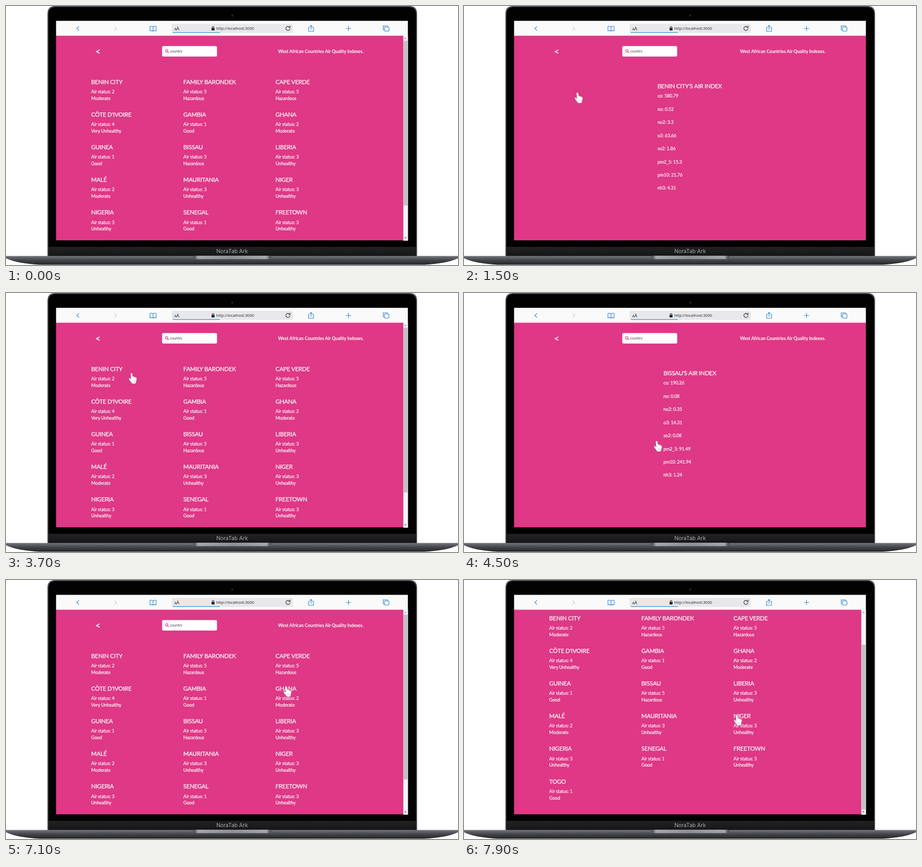
Write an HTML page that moves like this. It is 873 px wide and 501 px high and loops after 8 s.

```html
<!DOCTYPE html>
<html lang="en">
<head>
<meta charset="utf-8">
<title>Air quality indexes</title>
<style>
  html, body { margin: 0; width: 100%; height: 100%; overflow: hidden; background: #fff; }
  svg { display: block; width: 873px; height: 501px; }
  text { white-space: pre; }
  .page { font-family: Lato, sans-serif; font-size: 8.8px; fill: #fff; }
  .page text { letter-spacing: -.09px; stroke: #fff; stroke-width: .2px; }
  .page .h { font-size: 11.4px; letter-spacing: -.18px; stroke-width: .25px; }
  .page .brand { font-size: 8.6px; font-weight: 700; letter-spacing: 0; stroke: none; }
  .page .hint { font-size: 7.1px; fill: #444; letter-spacing: 0; stroke: none; }
  .blue { fill: none; stroke: #3488d3; stroke-width: 1.1; }
  .list, .benin, .bissau, .cursor, .scroll, .thumb { animation: 8s linear infinite; }

  /* Pages switch hard */
  .list { animation-name: list; animation-timing-function: step-end; }
  .benin { animation-name: benin; animation-timing-function: step-end; }
  .bissau { animation-name: bissau; animation-timing-function: step-end; }
  @keyframes list {
    0%, 42.5%, 83.75%, 100% { visibility: visible; }
    18.75%, 56.25% { visibility: hidden; }
  }
  @keyframes benin {
    0%, 42.5%, 100% { visibility: hidden; }
    18.75% { visibility: visible; }
  }
  @keyframes bissau {
    0%, 83.75%, 100% { visibility: hidden; }
    56.25% { visibility: visible; }
  }

  .scroll { animation-name: scroll; }
  .thumb { animation-name: thumb; }
  @keyframes scroll {
    0%, 91.25% { transform: translateY(0); animation-timing-function: steps(5, start); }
    97.5%, 100% { transform: translateY(-73px); }
  }
  @keyframes thumb {
    0%, 91.25% { transform: translateY(0); animation-timing-function: steps(5, start); }
    97.5%, 100% { transform: translateY(58px); }
  }

  /* The pointer advances in ticks of 100 ms */
  .cursor { animation-name: move, show; }
  @keyframes show {
    0% { opacity: 0; animation-timing-function: step-end; }
    5%, 100% { opacity: 1; }
  }
  @keyframes move {
    0%, 7.5% { transform: translate(300px, 245px); animation-timing-function: steps(2, start); }
    10%, 12.5% { transform: translate(232px, 182px); animation-timing-function: steps(2, start); }
    15%, 21.25% { transform: translate(219px, 167.2px); animation-timing-function: steps(11, start); }
    35% { transform: translate(179px, 95px); animation-timing-function: steps(2, start); }
    37.5%, 46.25% { transform: translate(177.5px, 89px); animation-timing-function: steps(3, start); }
    50%, 61.25% { transform: translate(372px, 286px); animation-timing-function: steps(4, start); }
    66.25%, 67.5% { transform: translate(335px, 195px); animation-timing-function: steps(4, start); }
    72.5%, 75% { transform: translate(235px, 118px); animation-timing-function: steps(3, start); }
    78.75%, 87.5% { transform: translate(176.5px, 87px); animation-timing-function: steps(2, start); }
    90%, 91.25% { transform: translate(541px, 205.2px); animation-timing-function: steps(5, start); }
    97.5% { transform: translate(528px, 257px); animation-timing-function: step-end; }
    98.75%, 100% { transform: translate(526.5px, 260.5px); }
  }
</style>
</head>
<body>
<svg viewBox="0 0 873 501">
  <defs>
    <clipPath id="view"><rect x="96.7" y="57.5" width="679.5" height="395.7"/></clipPath>
    <linearGradient id="chin" x2="0" y2="1">
      <stop offset="0" stop-color="#222224"/><stop offset="1" stop-color="#161617"/>
    </linearGradient>
    <linearGradient id="deck" x2="0" y2="1">
      <stop offset="0" stop-color="#77787c"/><stop offset=".25" stop-color="#5b5c61"/>
      <stop offset=".45" stop-color="#46474c"/><stop offset="1" stop-color="#232327"/>
    </linearGradient>
    <linearGradient id="notch">
      <stop offset="0" stop-color="#3c3d40"/><stop offset=".06" stop-color="#a6a7aa"/>
      <stop offset=".5" stop-color="#8f9093"/>
      <stop offset=".94" stop-color="#a6a7aa"/><stop offset="1" stop-color="#3c3d40"/>
    </linearGradient>
  </defs>

  <!-- Lid -->
  <path d="M80 484V15Q80 0 95 0H779Q794 0 794 15V484Z" fill="#505155"/>
  <path d="M82 484V16Q82 2 96 2H778Q792 2 792 16V484Z" fill="#020203"/>
  <rect x="82.5" y="466" width="709" height="17.5" fill="url(#chin)"/>
  <circle cx="437" cy="18.5" r="2.4" fill="#17181c"/>
  <circle cx="437" cy="18.5" r="1" fill="#29303c"/>
  <text x="436.7" y="478.3" text-anchor="middle" font-family="Inter, sans-serif" font-size="10.4px" fill="#aaaaac">NoraTab Ark</text>

  <!-- Base -->
  <path d="M0 483.6H873V488Q852 498 808 500.5H65Q21 498 0 488Z" fill="url(#deck)"/>
  <path d="M362 483H512V484Q512 489.5 505 489.5H369Q362 489.5 362 484Z" fill="url(#notch)"/>

  <!-- Browser bar -->
  <rect x="96.7" y="28.7" width="679.5" height="29.3" fill="#fafafa"/>
  <rect x="320" y="34.5" width="234" height="17.5" rx="3" fill="#e8e8ea"/>
  <path d="M322 51.4H413" stroke="#3b93d8" stroke-width="1.2"/>
  <g class="blue">
    <path d="M141 39.3L136.7 43.5L141 47.7"/>
    <path d="M209.5 39.3L213.8 43.5L209.5 47.7" stroke="#c9cbce"/>
    <path d="M284 40.3Q281 38.2 278 39.5V48Q281 47 284 48.5Q287 47 290 48V39.5Q287 38.2 284 40.3V48.5"/>
    <path d="M587 41.5H584.5V49H594V41.5H591.5M589.2 46V37.8M586.8 40L589.2 37.6L591.6 40"/>
    <path d="M656.5 43.5H666.5M661.5 38.5V48.5"/>
    <path d="M731 46H728.6V38.2H736.8V40.3"/>
    <rect x="731" y="40.5" width="8.6" height="8" rx="1"/>
    <path d="M547.6 40.8A4 4 0 1 0 548.5 43.8" stroke="#333"/>
    <path d="M548.8 38.3V41.7H545.4" stroke="#333"/>
    <path d="M398.3 43V41.3A1.6 1.6 0 0 1 401.5 41.3V43" stroke="#222"/>
  </g>
  <rect x="397" y="42.6" width="5.8" height="4.7" rx=".7" fill="#222"/>
  <g font-family="Open Sans, sans-serif" fill="#222">
    <text x="325" y="47" font-size="6.8px">A</text>
    <text x="329" y="47" font-size="8.8px">A</text>
    <text x="406" y="46.1" font-size="7.55px">http://localhost:3000</text>
  </g>

  <!-- Pages -->
  <g clip-path="url(#view)">
    <rect x="96" y="57" width="681" height="397" fill="#de3886"/>
    <g class="page list">
      <g class="scroll" id="countries"></g>
      <rect x="767.4" y="57" width="9" height="397" fill="#f4f4f4"/>
      <rect class="thumb" x="768" y="67" width="7.4" height="319" fill="#c1c1c1"/>
      <path d="M769.3 63.7L771.5 61L773.7 63.7Z" fill="#a3a3a3"/>
      <path d="M769.3 447.4L771.5 450.1L773.7 447.4Z" fill="#606060"/>
    </g>
    <g class="page benin" id="benin"></g>
    <g class="page bissau" id="bissau"></g>
  </g>

  <g class="cursor">
    <g transform="scale(1.05)">
      <path d="M-1.7 1.5Q-1.6 0 0 0Q1.5 0 1.7 1.5L2.3 6.3Q4.3 5.6 5 7.2Q6.7 6.5 7.4 8.1Q9.6 7.5 9.7 9.8Q9.8 13 8.6 15.8L8.3 19.3Q4 20.4 .4 19.5L-.3 17.3Q-2.6 15.2-4.6 11.7Q-5.5 9.7-4 9.3Q-2.6 9.1-1 11.4Z"
        fill="#fff" stroke="#6b2c4a" stroke-opacity=".6" stroke-width=".6"/>
      <path d="M2.4 6.5L2.7 9.5M5.1 7.3L5.3 9.8M7.5 8.2L7.6 10.3M2 13.5V17M4.2 13.5V17M6.3 13.3V16.8"
        fill="none" stroke="#a5a5a9" stroke-width=".5"/>
    </g>
  </g>
</svg>
<script>
  const $ = id => document.getElementById(id);
  const text = (x, y, s, cls = '') => `<text x="${x}" y="${y}" class="${cls}">${s}</text>`;

  function header(arrowX, boxX, titleX) {
    return `<path d="M${arrowX + 7} 84.9L${arrowX + .8} 88.2L${arrowX + 7} 91.5" fill="none" stroke="#fff" stroke-width="1.6"/>
      <rect x="${boxX}" y="77.5" width="106" height="20.2" rx="2.5"/>
      <circle cx="${boxX + 8.8}" cy="86.6" r="2.3" fill="none" stroke="#de3886" stroke-width="1.1"/>
      <path d="M${boxX + 10.5} 88.3l2.7 2.6" stroke="#de3886" stroke-width="1.3"/>`
      + text(boxX + 15.2, 89.8, 'country', 'hint')
      + text(titleX, 90.6, 'West African Countries Air Quality Indexes.', 'brand');
  }

  const levels = ['', 'Good', 'Moderate', 'Unhealthy', 'Very Unhealthy', 'Hazardous'];
  const countries = [
    ['BENIN CITY', 2], ['FAMILY BARONDEK', 5], ['CAPE VERDE', 5],
    ["CÔTE D'IVOIRE", 4], ['GAMBIA', 1], ['GHANA', 2],
    ['GUINEA', 1], ['BISSAU', 5], ['LIBERIA', 3],
    ['MALÉ', 2], ['MAURITANIA', 3], ['NIGER', 3],
    ['NIGERIA', 3], ['SENEGAL', 1], ['FREETOWN', 3],
    ['TOGO', 1]
  ];

  $('countries').innerHTML = header(173.8, 301.5, 525.5) + countries.map(([name, n], i) => {
    const x = 164.6 + i % 3 * 178, y = 150.6 + Math.floor(i / 3) * 63.2;
    return text(x, y, name, 'h') + text(x, y + 18.2, 'Air status: ' + n) + text(x, y + 30.9, levels[n]);
  }).join('');

  const gases = ['co', 'no', 'no2', 'o3', 'so2', 'pm2_5', 'pm10', 'nh3'];
  function detail(id, place, x, values) {
    $(id).innerHTML = header(175.3, 305.7, 532.9)
      + text(x, 159.4, place + "'S AIR INDEX", 'h')
      + values.map((v, i) => text(x, 177.4 + i * 25.43, gases[i] + ': ' + v)).join('');
  }
  detail('benin', 'BENIN CITY', 373.7, [580.79, 0.52, 3.3, 63.66, 1.86, 15.3, 21.76, 4.31]);
  detail('bissau', 'BISSAU', 385.3, [190.26, 0.08, 0.35, 14.31, 0.08, 91.49, 241.94, 1.24]);
</script>
</body>
</html>
```
